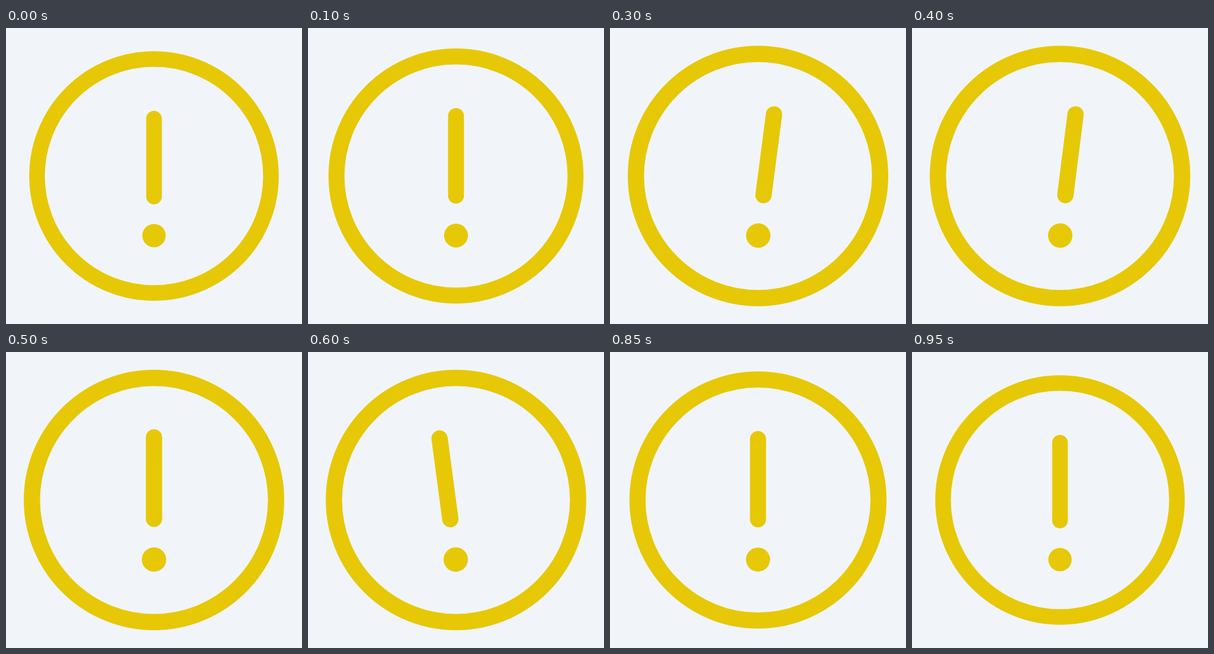
Recreate the animation shown at these times as an HTML page. Size 500 px wide and 500 px high, loop 1000 ms.

```html
<!DOCTYPE html>
<html lang="en">
<head>
<meta charset="utf-8">
<title>Warning icon</title>
<style>
  html, body {
    margin: 0;
    width: 100%;
    height: 100%;
    overflow: hidden;
    background: #f1f5fa;
  }
  svg {
    display: block;
    width: 100%;
    height: 100%;
  }
  .ring, .mark {
    animation: pulse 1s step-end infinite;
    transform-origin: 250px 250px;
  }
  .mark {
    transform-origin: 250px 354px;
    animation-name: pulse, wiggle;
  }

  /* Both run in 50 ms ticks, so each value holds until the next one */
  @keyframes pulse {
    0%   { scale: .958; }
    10%  { scale: .979; }
    15%  { scale: 1; }
    85%  { scale: .987; }
    90%  { scale: .967; }
    95%, 100% { scale: .958; }
  }
  @keyframes wiggle {
    0%   { rotate: 0deg; }
    25%  { rotate: 2.7deg; }
    30%  { rotate: 7.4deg; }
    35%  { rotate: 10deg; }
    40%  { rotate: 7.2deg; }
    45%  { rotate: 2.4deg; }
    50%  { rotate: 0deg; }
    55%  { rotate: -2.8deg; }
    60%  { rotate: -7.6deg; }
    65%  { rotate: -10deg; }
    70%  { rotate: -7deg; }
    75%  { rotate: -2.3deg; }
    80%, 100% { rotate: 0deg; }
  }
</style>
</head>
<body>
<svg viewBox="0 0 500 500" fill="#e6c806">
  <circle class="ring" cx="250" cy="250" r="206.25" fill="none" stroke="#e6c806" stroke-width="27.5"/>
  <g class="mark">
    <rect x="236.25" y="130.5" width="27.5" height="165" rx="13.75"/>
    <circle cx="250" cy="350.5" r="20.6"/>
  </g>
</svg>
</body>
</html>
```
